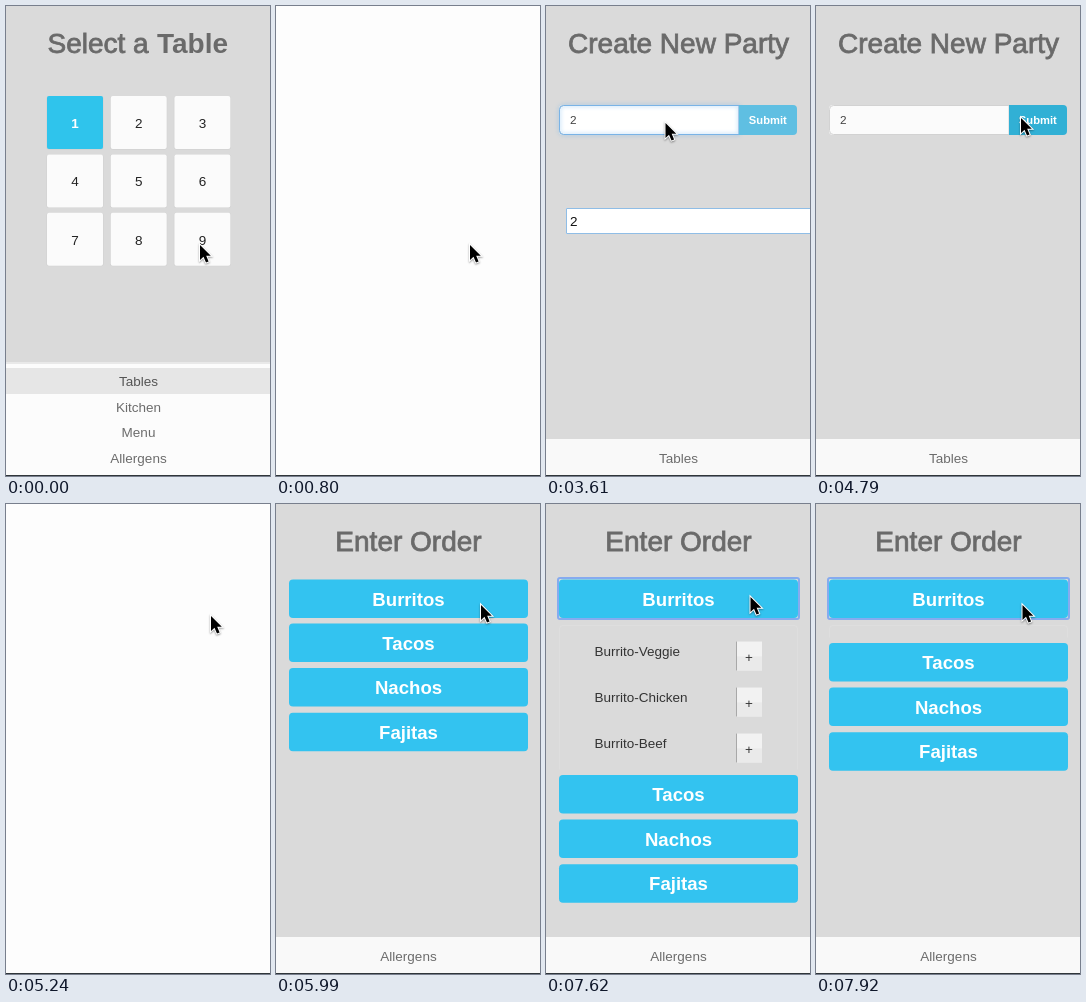
These frames come from a looping animation (264 by 470 pixels, 8 s). An HTML page with a canvas:

```html
<!DOCTYPE html>
<html lang="en">
<head>
<meta charset="utf-8">
<title>Table ordering</title>
<style>
html, body { margin: 0; width: 100%; height: 100%; overflow: hidden; background: #dadada; }
canvas { display: block; width: 264px; height: 470px; }
</style>
</head>
<body>
<canvas id="stage" width="264" height="470"></canvas>
<script>
const ctx = document.getElementById('stage').getContext('2d');
const LOOP = 8000;
const BLUE = '#33c3f0';

const POINTER = [
  [0, 194, 239], [1240, 187, 218], [1390, 148, 160], [1530, 121.5, 132.5],
  [1680, 118, 125], [1830, 119, 119], [1980, 119.5, 117],
  [3760, 126, 116], [3910, 143, 112], [4050, 166, 108], [4200, 187, 107],
  [4340, 200, 110], [4490, 205, 112],
  [5990, 205, 101], [6140, 204.5, 93], [7920, 206.5, 101],
];
// [time, extra height of the first menu section]
const EXPANSION = [
  [0, 0], [6430, 20], [6580, 108], [6730, 153], [6880, 167],
  [7620, 151.5], [7770, 72], [7920, 19.5],
];

const held = (steps, t) => steps.filter(s => s[0] <= t).pop();
const within = (t, from, to) => t >= from && t < to;

function rect(x, y, w, h, fill, radius = 0) {
  ctx.fillStyle = fill;
  ctx.beginPath();
  ctx.roundRect(x, y, w, h, radius);
  ctx.fill();
}

function outline(x, y, w, h, color, width = 1, radius = 0) {
  ctx.strokeStyle = color;
  ctx.lineWidth = width;
  ctx.beginPath();
  ctx.roundRect(x, y, w, h, radius);
  ctx.stroke();
}

function text(str, x, y, size, color, { align = 'center', bold = false, weight = 0 } = {}) {
  ctx.font = `${bold ? 'bold ' : ''}${size}px "Liberation Sans", Arial, sans-serif`;
  ctx.textAlign = align;
  ctx.fillStyle = color;
  ctx.fillText(str, x, y);
  if (weight) {
    ctx.strokeStyle = color;
    ctx.lineWidth = weight;
    ctx.strokeText(str, x, y);
  }
}

const title = (str, x = 132.5, opts) =>
  text(str, x, 47, 28, '#6a6a6a', { weight: 0.8, ...opts });

function footer(label) {
  rect(0, 433, 264, 37, '#f9f9f9');
  text(label, 132.5, 457, 13.5, '#6c6c6c');
}

function tablesPage(t) {
  const active = t < 500 ? 1 : 9;
  title('Select a ', 41.5, { align: 'left' });
  title('Table', 151, { align: 'left', bold: true, weight: 0 });
  for (let n = 1; n <= 9; n++) {
    const x = 41 + (n - 1) % 3 * 63.7;
    const y = 90 + Math.floor((n - 1) / 3) * 58.4;
    const on = n === active;
    rect(x - 0.5, y, 57, 53.5, '#d0d0d0', 2);
    rect(x, y, 56, 53, on ? '#2fc4ec' : '#fbfbfb', 2);
    text(n, x + 28, y + 32, 13.5, on ? '#fff' : '#222', { bold: on });
  }
  rect(0, 356, 264, 114, '#e9e9e9');
  rect(0, 358, 264, 112, '#fcfcfc');
  rect(0, 362, 264, 26, '#e6e6e6');
  ['Tables', 'Kitchen', 'Menu', 'Allergens'].forEach((label, i) =>
    text(label, 132.5, 380 + i * 25.6, 13.5, i ? '#6c6c6c' : '#555'));
}

function partyPage(t) {
  const typed = t >= 3010;
  const focus = t >= 4790 ? 0 : Math.min(1, Math.max(0, (t - 1830) / 440));
  title('Create New Party');
  rect(13, 99, 180, 30, focus ? '#fff' : '#fbfbfb', [4, 0, 0, 4]);
  outline(13.5, 99.5, 179.5, 29, '#d2d2d2', 1, [4, 0, 0, 4]);
  if (t >= 1980 && focus) {
    ctx.save();
    ctx.globalAlpha = focus;
    ctx.shadowColor = '#66afe9';
    ctx.shadowBlur = 4;
    outline(13.5, 99.5, 179.5, 29, '#79b3e6', 1, [4, 0, 0, 4]);
    ctx.restore();
  }
  rect(193, 99, 58, 30, within(t, 4790, 4940) ? '#31b0d5' : '#5fbfe2', [0, 4, 4, 0]);
  text('Submit', 221.8, 118, 11.2, '#fff', { bold: true });
  if (typed) text('2', 24, 118, 11.8, '#444', { align: 'left' });
  else text('Number of guests?', 24, 118, 11.8, '#858585', { align: 'left' });

  if (within(t, 1980, 2560)) rect(24, 107, 1, 14, '#444');
  if (within(t, 3010, 3610) || within(t, 4050, 4490)) rect(31, 107, 1, 14, '#444');

  if (within(t, 3010, 4790)) {
    rect(20, 202, 250, 26, '#fff');
    outline(20.5, 202.5, 250, 25, '#8fbde6');
    text('2', 24, 220, 13.5, '#111', { align: 'left' });
  }
  footer('Tables');
}

function menuButton(label, y) {
  rect(13, y, 239, 38.5, BLUE, 4);
  text(label, 132.5, y + 26, 18.6, '#fff', { bold: true });
}

function orderPage(t) {
  const open = held(EXPANSION, t)[1];
  title('Enter Order');
  menuButton('Burritos', 75.5);
  if (t >= 6430) outline(12, 74, 241, 41, '#86abef', 2, 2);
  if (open) {
    ctx.save();
    ctx.beginPath();
    ctx.rect(0, 120, 264, open - 6);
    ctx.clip();
    outline(13.5, 121.5, 238, 160, '#dedede', 1, 3);
    ['Veggie', 'Chicken', 'Beef'].forEach((kind, i) => {
      const y = 137.5 + i * 46;
      text('Burrito-' + kind, 48.5, y + 14.5, 13.5, '#333', { align: 'left' });
      rect(190, y, 26, 29, '#f2f2f2');
      rect(190, y + 15, 26, 14, '#eaeaea');
      rect(190, y, 1, 29, '#a8a8a8');
      text('+', 203, y + 20.5, 13.5, '#333');
    });
    ctx.restore();
  }
  ['Tacos', 'Nachos', 'Fajitas'].forEach((label, i) =>
    menuButton(label, 119.5 + open + i * 44.6));
  footer('Allergens');
}

function pointer(x, y) {
  const arrow = new Path2D('M0 0V15L3.5 11.8L6 17.5L8.6 16.4L6.2 10.8H10.8Z');
  ctx.save();
  ctx.translate(x, y);
  ctx.shadowColor = 'rgba(0,0,0,.4)';
  ctx.shadowBlur = 2;
  ctx.shadowOffsetY = 1;
  ctx.lineWidth = 2;
  ctx.strokeStyle = '#fff';
  ctx.stroke(arrow);
  ctx.shadowColor = 'transparent';
  ctx.fillStyle = '#000';
  ctx.fill(arrow);
  ctx.restore();
}

function draw(t) {
  const loading = within(t, 800, 940) || within(t, 5240, 5390);
  rect(0, 0, 264, 470, loading ? '#fdfdfd' : '#dadada');
  if (!loading) (t < 800 ? tablesPage : t < 5240 ? partyPage : orderPage)(t);
  rect(0, 469, 264, 1, '#30363a');
  const [, x, y] = held(POINTER, t);
  pointer(x, y);
}

const start = performance.now();
function tick() {
  draw((performance.now() - start) % LOOP);
  requestAnimationFrame(tick);
}
tick();
</script>
</body>
</html>
```
